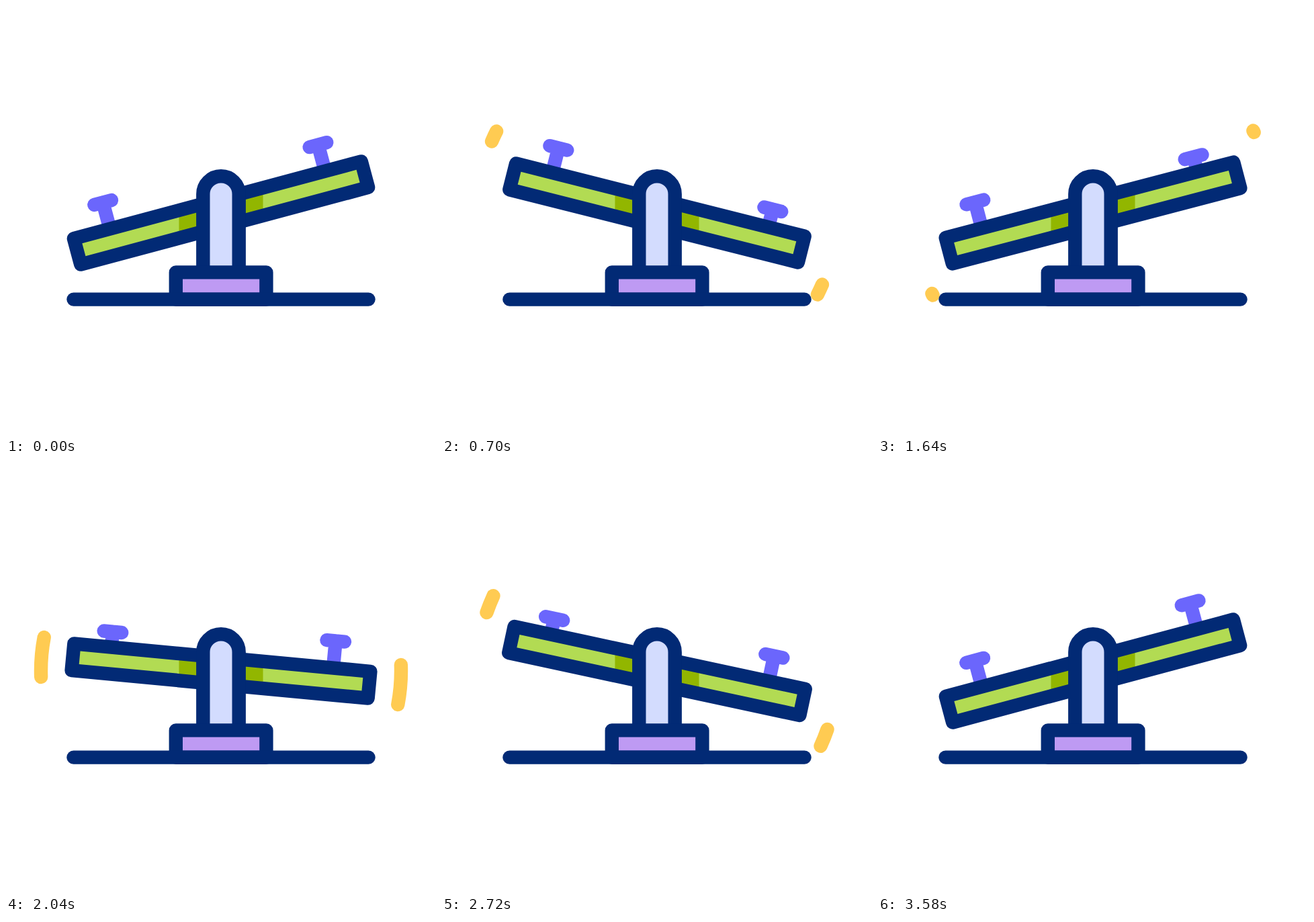
These frames come from a looping animation (640x640 px, 3.6 s). An HTML page:

```html
<!DOCTYPE html>
<html lang="en">
<head>
<meta charset="utf-8">
<title>Seesaw</title>
<style>
  html, body { margin: 0; width: 100%; height: 100%; overflow: hidden; background: #fff; }
  svg { display: block; width: 100vw; height: 100vh; }
  .ink { stroke: #022a75; }
  .grip { stroke: #6b66fc; }
  .arc { stroke: #ffcb52; }
</style>
</head>
<body>
<svg viewBox="0 0 640 640" fill="none" stroke-width="20.4" stroke-linecap="round" stroke-linejoin="round">
  <defs>
    <clipPath id="middle"><rect x="257.5" y="200" width="125" height="220"/></clipPath>
    <path id="handle" class="grip" d="M-13.3 0H13.3M0 0V34"/>
  </defs>
  <path id="arcs" class="arc"/>
  <g class="tilt">
    <use id="left" href="#handle"/>
    <use id="right" href="#handle"/>
    <rect x="98.5" y="288" width="443" height="40" fill="#b2db53"/>
  </g>
  <g clip-path="url(#middle)">
    <rect class="tilt" x="98.5" y="288" width="443" height="40" fill="#92b600"/>
  </g>
  <rect class="tilt ink" x="98.5" y="288" width="443" height="40"/>
  <path class="ink" fill="#d3dcfe" d="M293.3 396.5V280a26.7 26.7 0 0 1 53.4 0V396.5"/>
  <rect class="ink" x="252.8" y="396.4" width="134.6" height="40.2" fill="#be9af3"/>
  <path class="ink" d="M100.5 436.6H539.5"/>
</svg>
<script>
const LOOP = 3600, CX = 320, CY = 308, TILT = 15;
const ARC_R = 268, ARC_SPAN = 27.2;
const $ = id => document.getElementById(id);
const tilted = document.querySelectorAll('.tilt');

// cubic-bezier(x1, 0, x2, 1)
const bezier = (x1, x2) => u => {
  if (u <= 0) return 0;
  if (u >= 1) return 1;
  let lo = 0, hi = 1, s;
  for (let i = 0; i < 30; i++) {
    s = (lo + hi) / 2;
    const x = 3 * x1 * s * (1 - s) ** 2 + 3 * x2 * s * s * (1 - s) + s ** 3;
    if (x < u) lo = s; else hi = s;
  }
  return s * s * (3 - 2 * s);
};
const even = bezier(.42, .58), late = bezier(.441, .694);

// Each swing: [start, end] of the plank and of both ends of its motion lines
const quick = (start, end) => ({
  ease: even, plank: [start, end], lead: [start, start + 735], trail: [start + 105, start + 835]
});
const swings = [
  quick(0, 795),
  quick(795, 1585),
  quick(1585, 2335),
  { ease: late, plank: [2450, 3600], lead: [2412, 3455], trail: [2552, 3580] }
];
const progress = (t, [from, to], ease) => ease((t - from) / (to - from));

const polar = deg => {
  const a = deg * Math.PI / 180;
  return [ARC_R * Math.cos(a), ARC_R * Math.sin(a)];
};

// The same arc on both sides, turned by half a circle
function arcPair(a, b) {
  const [x1, y1] = polar(a), [x2, y2] = polar(b);
  const sweep = b > a ? 1 : 0;
  return [1, -1].map(k =>
    `M${CX + k * x1} ${CY + k * y1}A${ARC_R} ${ARC_R} 0 0 ${sweep} ${CX + k * x2} ${CY + k * y2}`
  ).join('');
}

// Four bounces; returns the height of the grip above the pivot
function bounce(t, start, period) {
  const n = (t - start) / period;
  const wave = n > 0 && n < 4 ? Math.cos(2 * Math.PI * n) : 1;
  return 51.5 + 9 * wave;
}

function draw(t) {
  let angle = -TILT, arcs = '';
  swings.forEach(({ ease, plank, lead, trail }, i) => {
    const dir = i % 2 ? -1 : 1;
    angle += dir * 2 * TILT * progress(t, plank, ease);
    const a = progress(t, trail, ease), b = progress(t, lead, ease);
    if (b - a > .0005) {
      const place = p => dir * ARC_SPAN * (2 * p - 1);
      arcs += arcPair(place(a), place(b));
    }
  });
  tilted.forEach(el => el.setAttribute('transform', `rotate(${angle} ${CX} ${CY})`));
  $('arcs').setAttribute('d', arcs);
  $('left').setAttribute('transform', `translate(${CX - 165.8} ${CY - bounce(t, 0, 800)})`);
  $('right').setAttribute('transform', `translate(${CX + 165.8} ${CY - bounce(t, 440, 790)})`);
}

let begin;
function tick(now) {
  begin ??= now;
  draw((now - begin) % LOOP);
  requestAnimationFrame(tick);
}
draw(0);
requestAnimationFrame(tick);
</script>
</body>
</html>
```
